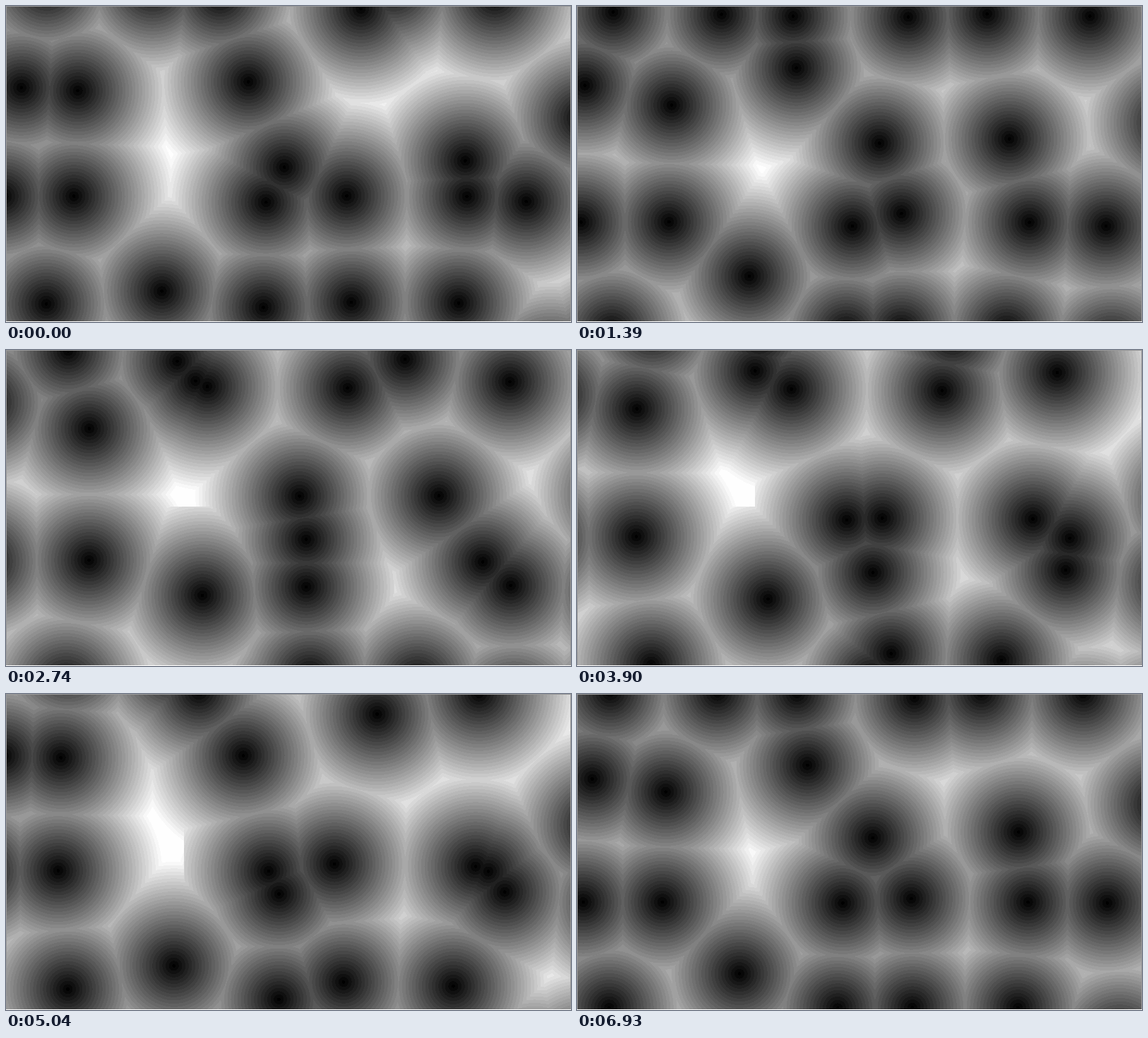
Recreate the animation shown at these times as an HTML page with a canvas. Size 800 px wide and 448 px high, loop 7100 ms.

```html
<!DOCTYPE html>
<html lang="en">
<head>
<meta charset="utf-8">
<title>Cellular noise</title>
<style>
  html, body { margin: 0; width: 100%; height: 100%; overflow: hidden; background: #fff; }
  canvas { display: block; width: 800px; height: 447px; }
</style>
</head>
<body>
<canvas id="stage" width="800" height="447"></canvas>
<script>
const W = 800, H = 447, CELL = 149, CX = 400.5, CY = 222.3;
const LOOP = 7100, PERIOD = 6080;
const START = -0.218, SPREAD = 4.91, SWING = 0.2;
const BAND = 8, BORDER = 0x99;
const COLS = 7, ROWS = 5, LEFT = -3, BOTTOM = -2;

// Home positions inside the cells, row by row from bottom left to the centre cell.
// The field is odd: the opposite cell has the negated position, modulo 1.
const HOMES = [
  [.817, .5], [.992, .977], [.952, .436], [.397, .554], [.422, .521], [.3, .05], [.017, .109],
  [.172, .609], [0, .614], [.982, .438], [.35, .718], [.796, .605], [.154, .45], [.173, .391],
  [.277, .877], [.019, .746], [.425, .968], [0, 0]
];

// Tempo: each passage ends at a time and is cut into equal steps of whole 10 ms
const TEMPO = [[1930, 7], [2470, 3], [2740, 1], [3620, 6], [5040, 5], [5860, 5], [6660, 3], [6930, 2]];

function stepTime(t) {
  let from = 0;
  for (const [to, count] of TEMPO) {
    if (t < to) {
      const at = n => Math.floor((from + (to - from) * n / count) / 10) * 10;
      let n = count - 1;
      while (at(n) > t) n--;
      return at(n);
    }
    from = to;
  }
  return from;
}

const ctx = document.getElementById('stage').getContext('2d');
const image = ctx.createImageData(W, H);
const pixels = new Uint32Array(image.data.buffer);
const gray = v => (0xff000000 | v << 16 | v << 8 | v) >>> 0;

function home(n) {
  return HOMES[n] || HOMES[COLS * ROWS - 1 - n].map(p => (1 - p) % 1);
}

function pointsAt(ms) {
  const angle = ms / PERIOD * 2 * Math.PI + START;
  const sway = p => p + SWING * Math.sin(angle + SPREAD * p);
  return Array.from({ length: COLS * ROWS }, (_, n) => {
    const i = LEFT + n % COLS, j = BOTTOM + Math.floor(n / COLS);
    const [px, py] = home(n);
    return { i, j, x: CX + (i + sway(px)) * CELL, y: CY - (j + sway(py)) * CELL };
  });
}

// Each cell only sees the points of its own and the eight surrounding cells
function drawCell(i, j, points) {
  const near = points.filter(p => Math.abs(p.i - i) < 2 && Math.abs(p.j - j) < 2);
  const edge = (v, max) => Math.min(max, Math.max(1, Math.round(v)));
  const x0 = edge(CX + i * CELL, W - 1), x1 = edge(CX + (i + 1) * CELL, W - 1);
  const y0 = edge(CY - (j + 1) * CELL, H), y1 = edge(CY - j * CELL, H);
  for (let y = y0; y < y1; y++) {
    for (let x = x0; x < x1; x++) {
      let best = CELL * CELL;
      for (const p of near) {
        const dx = x + 0.5 - p.x, dy = y + 0.5 - p.y;
        best = Math.min(best, dx * dx + dy * dy);
      }
      const level = Math.sqrt(best) / CELL * 255;
      pixels[y * W + x] = gray(Math.min(254, Math.round(level / BAND) * BAND));
    }
  }
}

function draw(ms) {
  const points = pointsAt(ms);
  pixels.fill(gray(BORDER));
  for (let j = -2; j <= 1; j++) {
    for (let i = -3; i <= 2; i++) drawCell(i, j, points);
  }
  ctx.putImageData(image, 0, 0);
}

let shown = -1;
const origin = performance.now();
function tick() {
  const time = stepTime((performance.now() - origin) % LOOP);
  if (time !== shown) {
    shown = time;
    draw(time);
  }
  requestAnimationFrame(tick);
}
tick();
</script>
</body>
</html>
```
